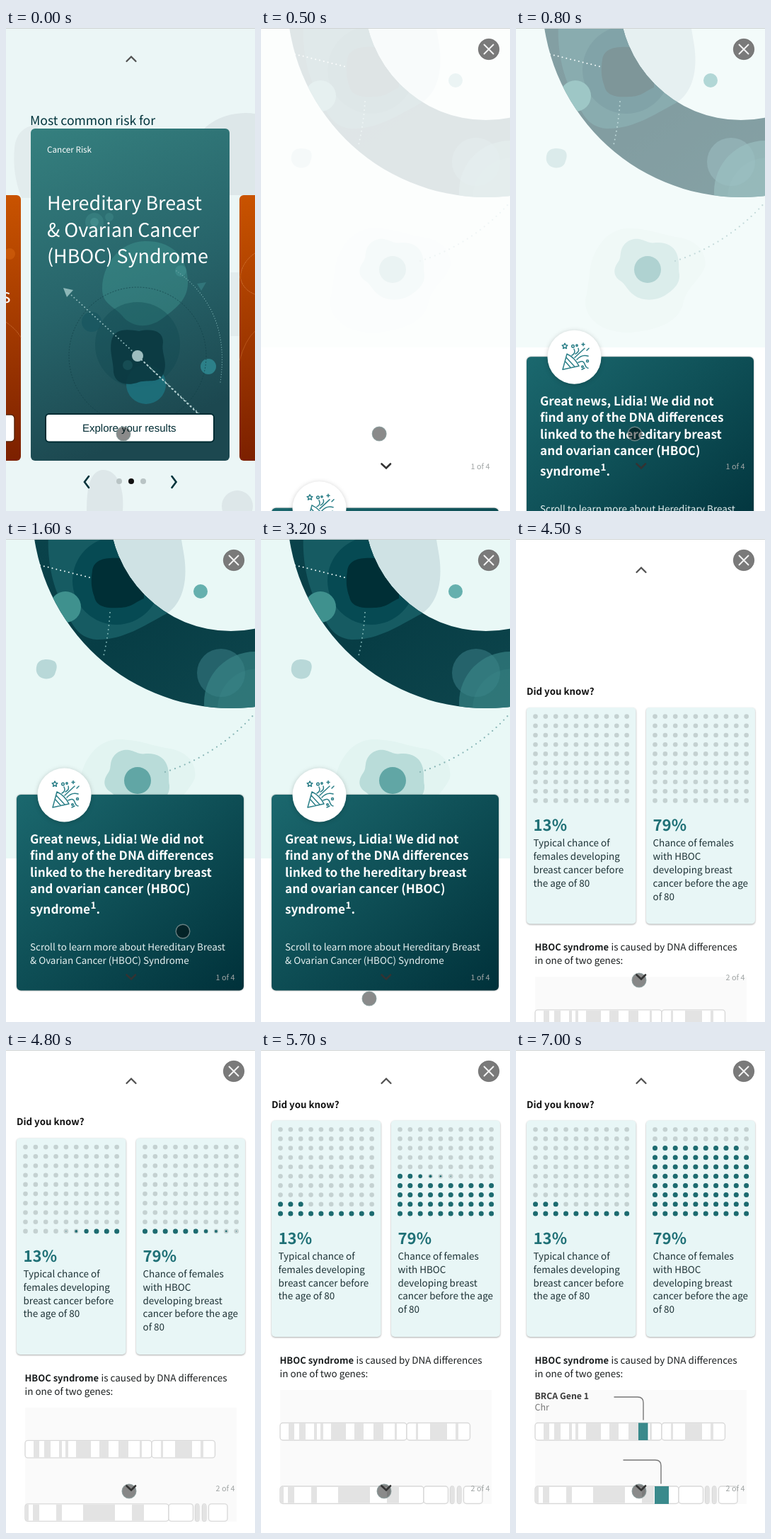
An HTML page that plays this animation: 352 px wide and 682 px high, repeating every 7100 ms.

```html
<!DOCTYPE html>
<html lang="en">
<head>
<meta charset="utf-8">
<title>Risk report</title>
<style>
  html, body { margin: 0; width: 100%; height: 100%; overflow: hidden; background: #fff; }
  svg { display: block; width: 100vw; height: 100vh; }
  text { font-family: "Noto Sans CJK SC", "Noto Sans CJK JP", "Noto Sans", sans-serif; font-size: 13.46px;
         white-space: pre; text-rendering: geometricPrecision; }
  .b { font-weight: 700; }
  .line { fill: none; stroke-linecap: round; }
  .dots { fill: none; stroke-linecap: round; stroke-width: 2; stroke-dasharray: 0 6; }
</style>
</head>
<body>
<svg viewBox="0 0 352 682">
  <defs>
    <linearGradient id="teal" x2=".25" y2="1"><stop stop-color="#35807f"/><stop offset=".55" stop-color="#27646a"/><stop offset="1" stop-color="#1c4850"/></linearGradient>
    <linearGradient id="rust" x2="0" y2="1"><stop stop-color="#c95300"/><stop offset="1" stop-color="#7c2000"/></linearGradient>
    <linearGradient id="deep" x2="1" y2="1"><stop stop-color="#1b686e"/><stop offset=".45" stop-color="#0f5057"/><stop offset="1" stop-color="#00313a"/></linearGradient>
    <linearGradient id="ringFill" x2="1" y2="1"><stop stop-color="#0a434b"/><stop offset=".5" stop-color="#073d45"/><stop offset="1" stop-color="#0e464d"/></linearGradient>
    <path id="ringShape" clip-rule="evenodd" d="M37-42a281 281 0 0 0 562 0a281 281 0 0 0-562 0zM146-42a172 172 0 0 1 344 0a172 172 0 0 1-344 0z"/>
    <clipPath id="ring"><use href="#ringShape" clip-rule="evenodd"/></clipPath>
    <clipPath id="hole"><circle cx="318" cy="-42" r="172"/></clipPath>
    <clipPath id="cardClip"><rect x="35" y="142" width="281" height="469" rx="6"/></clipPath>
    <path id="cloud" d="M60-5C58 30 66 68 80 92C92 118 100 140 128 142C165 143 196 122 222 108C246 97 258 66 252 25L247-5z"/>
  </defs>

  <g id="carousel">
    <rect width="352" height="682" fill="#ebf6f6"/>
    <g fill="#dde7e9">
      <path d="M268 160C280 130 320 116 352 121V236H300C275 215 262 185 268 160z"/>
      <path d="M12 170C14 145 30 138 45 136V240H22C12 215 10 190 12 170z" fill="#e2eced"/>
      <path d="M114 682C114 650 118 628 135 624C155 622 168 645 165 682z"/>
      <circle cx="327" cy="675" r="22"/>
      <rect x="317" y="345" width="14" height="90" fill="#e2eced"/>
    </g>
    <text x="34" y="137" fill="#01333b" style="font-size:17.6px">Most common risk for</text>

    <g fill="url(#rust)">
      <rect x="-260" y="236" width="281" height="375" rx="6"/>
      <rect x="330" y="236" width="281" height="375" rx="6"/>
    </g>
    <circle cx="5" cy="319" r="8" fill="#d8650f" opacity=".5"/>
    <path class="line" d="M-5 412Q14 424 21 437M352 318A45 45 0 0 0 331 352M331 352Q335 370 352 376" stroke="#e08a50" stroke-dasharray="1.5 1.5" opacity=".6"/>
    <path class="line" d="M330 470Q338 440 352 428" stroke="#d07030" opacity=".5"/>
    <text x="-6" y="388" fill="#fff" style="font-size:26.9px">s</text>
    <rect x="-30" y="546" width="42" height="38" rx="5" fill="#fff" stroke="#5a2408" stroke-width="1.5"/>

    <g clip-path="url(#cardClip)">
      <rect x="35" y="142" width="281" height="469" fill="url(#teal)"/>
      <path d="M136 368C136 335 160 302 196 301C236 300 258 325 257 362C256 384 240 396 224 408C204 425 178 424 164 406C152 392 136 390 136 368z" fill="#45a09a" opacity=".38"/>
      <circle cx="125" cy="274" r="13" fill="#4b9b99" opacity=".3"/>
      <circle cx="125" cy="274" r="6" fill="#5aa9a5" opacity=".35"/>
      <circle cx="146" cy="267" r="6" fill="#4b9b99" opacity=".3"/>
      <circle cx="186" cy="447" r="60" fill="#0e454d" opacity=".35"/>
      <circle cx="121" cy="415" r="14" fill="#17565f" opacity=".7"/>
      <circle cx="198" cy="503" r="28" fill="#1d7581" opacity=".8"/>
      <path d="M149 442C153 424 170 425 188 428C208 424 222 428 222 444C219 460 229 470 223 487C217 503 202 496 188 500C172 506 154 503 152 486C152 470 146 458 149 442z" fill="#0b3a42" opacity=".93"/>
      <circle cx="172" cy="476" r="7" fill="#164c53"/>
      <circle cx="286" cy="478" r="11" fill="#2c8089"/>
      <circle cx="247" cy="343" r="8" fill="#3f8f90" opacity=".6"/>
      <path d="M270 361L283 359L276 371z" fill="#3b8588" opacity=".6"/>
      <circle cx="186" cy="463" r="97" fill="none" stroke="#123f47" stroke-dasharray="2 2" opacity=".7"/>
      <path class="dots" d="M241 343Q318 398 303 500" stroke="#77adae" style="stroke-width:1.3;stroke-dasharray:0 3.5"/>
      <path class="dots" d="M89 374L186 463L280 551" stroke="#8fb9ba" style="stroke-dasharray:0 5"/>
      <path d="M186 463L272 545" stroke="#b9d3d4" stroke-width="1.8" stroke-dasharray="3 3"/>
      <path d="M81 367L95 370L86 380z" fill="#8db7b8"/>
      <circle cx="186" cy="463" r="8" fill="#9dbdbf"/>
    </g>
    <g fill="#fff">
      <text x="58" y="176" style="font-size:11.7px">Cancer Risk</text>
      <g id="cardTitle"></g>
    </g>
    <rect x="56" y="545" width="238" height="39.5" rx="5" fill="#fff" stroke="#002c33" stroke-width="2"/>
    <text x="108" y="570" fill="#002c33" style="font:15px 'Liberation Sans',Arial,sans-serif">Explore your results</text>
    <path class="line" d="M117 633L111 641L117 649M234.5 633L240.5 641L234.5 649" stroke="#01333b" stroke-width="2.6"/>
    <g fill="#b9c4c5"><circle cx="160" cy="640" r="4"/><circle cx="177" cy="640" r="4" fill="#111"/><circle cx="194" cy="640" r="4"/></g>
  </g>

  <g id="result">
    <g id="hero">
      <rect width="352" height="451" fill="#e9f8f6"/>
      <use href="#cloud" fill="#cfe2e4" clip-path="url(#hole)"/>
      <g clip-path="url(#ring)">
        <rect width="352" height="245" fill="url(#ringFill)"/>
        <use href="#cloud" fill="#165b62"/>
        <circle cx="156" cy="59" r="62" fill="#064a53"/>
        <path d="M122 45C124 28 142 26 160 27L195 40V84C184 88 178 97 160 97C145 98 128 97 125 82C120 68 120 58 122 45z" fill="#002f36"/>
        <circle cx="304" cy="189" r="34" fill="#25636b"/>
        <circle cx="352" cy="231" r="72" fill="#3a8688" opacity=".65"/>
        <circle cx="356" cy="240" r="57" fill="#43908f" opacity=".2"/>
        <circle cx="84" cy="96" r="22" fill="#3f918e"/>
      </g>
      <path class="dots" d="M48 37L121 55" stroke="#eaf6f5"/>
      <path class="dots" d="M147 104Q145 135 138 165" stroke="#7eb3b3"/>
      <circle cx="275" cy="74" r="10" fill="#65b0ae"/>
      <path d="M44 177C48 168 62 169 69 173C74 179 71 185 69 191C65 199 53 199 47 194C42 189 42 183 44 177z" fill="#b8d8d8"/>
      <path d="M104 345C108 312 128 284 158 283C190 283 204 292 232 296C258 301 270 318 267 338C258 358 240 368 236 390C230 416 196 428 160 430C122 431 96 410 98 384C102 368 102 360 104 345z" fill="#e2f4f1"/>
      <path d="M148 318C150 302 164 296 174 298C184 300 188 305 198 303C212 302 223 308 227 318C232 330 229 338 231 348C232 362 222 370 210 378C196 386 178 385 168 378C156 370 156 362 146 356C136 348 139 338 144 331C148 325 147 323 148 318z" fill="#b9dcd9"/>
      <circle cx="186" cy="341" r="19" fill="#61a6a5"/>
      <path class="dots" d="M225 329Q300 305 354 244" stroke="#8ab7b7" style="stroke-width:2.3;stroke-dasharray:0 7.4"/>
    </g>
    <g id="news">
      <rect x="15" y="361" width="321" height="276.5" rx="6" fill="url(#deep)" style="filter:drop-shadow(0 0 1px #0006)"/>
      <circle cx="82.5" cy="361.5" r="38" fill="#fff" style="filter:drop-shadow(0 1px 3px #0003)"/>
      <g class="line" stroke="#2b7f88" stroke-width="1.5" stroke-linejoin="round">
        <path d="M66 379L72 357Q83 362 89 374zM70 368L77 376M71 362L83 375"/>
        <path d="M79 359Q85 356 82 350M83 362L97 349M86 365Q93 357 102 360M88 369Q95 365 97 371T102 377M84 357Q90 354 88 349"/>
        <path d="M69 342l1.2 2.4 2.6.4-1.9 1.9.5 2.6-2.4-1.300-2.400 1.300.5-2.600-1.900-1.900 2.600-.4zM95 341.500v4M93 343.500h4M93 379l4-2M100 352l3-3"/>
        <circle cx="80.5" cy="346" r="1.8"/><circle cx="86" cy="345" r="1.2"/><circle cx="101" cy="367" r="1.5"/><circle cx="94" cy="375" r="1.3"/>
      </g>
      <g id="headline" fill="#fff"></g>
      <text class="b" x="119.5" y="521.5" fill="#fff" style="font-size:13.5px">1</text>
      <text class="b" x="127.5" y="529" fill="#fff" style="font-size:17.2px">.</text>
      <g id="hint" fill="#e6f1f1"></g>
    </g>
  </g>

  <g id="facts">
    <g id="page">
      <text class="b" x="15" y="81.5" fill="#111" style="font-size:13.3px">Did you know?</text>
      <g fill="#e8f6f6" style="filter:drop-shadow(0 1px 1px #0005)">
        <rect x="15" y="99.5" width="154.5" height="305.5" rx="5"/>
        <rect x="184" y="99.5" width="154" height="305.5" rx="5"/>
      </g>
      <g id="dotsLeft"></g><g id="dotsRight"></g>
      <g class="b" fill="#1f7076">
        <text x="24.5" y="274" style="font-size:22.2px">13%</text>
        <text x="193.5" y="274" style="font-size:22.2px">79%</text>
      </g>
      <g fill="#1d3236"><g id="typical"></g><g id="raised"></g></g>
      <g fill="#1b1f20">
        <text class="b" x="26.5" y="443" style="font-size:13px">HBOC syndrome</text>
        <text x="134.5" y="443">is caused by DNA differences</text>
        <text x="26.5" y="462">in one of two genes:</text>
      </g>
      <rect x="27" y="480" width="299" height="161" fill="#fafafa"/>
      <g id="genes"></g>
      <g id="marks" fill="#3a8a8c"><rect x="173" y="526.5" width="13.5" height="24.5"/><rect x="196" y="616" width="20" height="25"/></g>
      <path id="lead1" class="line" stroke="#777" stroke-width="1.4" d="M180 522V498Q180 490 172 490H139"/>
      <path id="lead2" class="line" stroke="#777" stroke-width="1.4" d="M205 612V587Q205 579 197 579H152"/>
      <text id="gene" class="b" x="26.5" y="493" fill="#3a3a3a" style="font-size:12.3px"></text>
      <text id="chr" x="26.5" y="509" fill="#777" style="font-size:12.5px"></text>
    </g>
  </g>

  <path id="up" class="line" d="M170.5 47L177 40.5L183.5 47" stroke="#505050" stroke-width="2.2"/>
  <g id="close">
    <circle cx="322" cy="30" r="14.7" fill="#7a7a7a" stroke="#6c6c6c" stroke-width=".8"/>
    <path class="line" d="M315.500 23.500L328.500 36.500M328.500 23.500L315.500 36.500" stroke="#f4f4f4" stroke-width="1.9"/>
  </g>
  <circle id="cursor" r="9.8" fill="rgba(0,0,0,.46)" stroke="rgba(128,145,145,.8)" stroke-width="1.4"/>
  <g id="pager">
    <path class="line" d="M170.5 615.5L177 621.5L183 615.5" stroke="#333" stroke-width="2.6"/>
    <text id="count" x="296.5" y="623" fill="#a0a5a5" style="font-size:10.8px"></text>
  </g>
  <rect width="352" height="1" fill="#cfd3d3"/>
</svg>
<script>
const LOOP = 7100, OPEN = 400, NEXT = 4100;
const $ = id => document.getElementById(id);
const clamp = v => Math.max(0, Math.min(1, v));
const span = (t, from, to) => clamp((t - from) / (to - from));
const show = (id, on) => $(id).style.display = on ? '' : 'none';

function add(parent, tag, attrs, text = '') {
  const el = document.createElementNS('http://www.w3.org/2000/svg', tag);
  for (const key in attrs) el.setAttribute(key, attrs[key]);
  el.textContent = text;
  return parent.appendChild(el);
}
function lines(id, x, y, pitch, style, rows) {
  rows.forEach((row, i) => add($(id), 'text', { x, y: y + i * pitch, style }, row));
}
const headlineStyle = 'font-size:17.2px;font-weight:700';
lines('cardTitle', 58, 257, 37.5, 'font-size:26.9px', ['Hereditary Breast', '& Ovarian Cancer', '(HBOC) Syndrome']);
lines('headline', 34, 429.5, 23.5, headlineStyle,
  ['Great news, Lidia! We did not', 'find any of the DNA differences', 'linked to the hereditary breast', 'and ovarian cancer (HBOC)']);
lines('headline', 34, 529, 0, headlineStyle, ['syndrome']);
lines('hint', 34, 581, 19, '', ['Scroll to learn more about Hereditary Breast', '& Ovarian Cancer (HBOC) Syndrome']);
lines('typical', 24.5, 296, 18.8, '', ['Typical chance of', 'females developing', 'breast cancer before', 'the age of 80']);
lines('raised', 193.5, 296, 18.8, '', ['Chance of females', 'with HBOC', 'developing breast', 'cancer before the age', 'of 80']);

// Grid of 100 dots; returns the ones that fill, bottom row first.
function dotGrid(id, x0, count, column) {
  const filled = [];
  for (let i = 0; i < 100; i++) {
    const row = Math.floor(i / 10);
    const pos = { cx: x0 + column(i % 10, row) * 14.35, cy: 231 - row * 13.2 };
    add($(id), 'circle', { ...pos, r: 3.3, fill: '#c4d1d1' });
    if (i < count) filled.push(add($(id), 'circle', { ...pos, r: 0, fill: '#1c6b70' }));
  }
  return filled;
}
const leftDots = dotGrid('dotsLeft', 27.5, 13, (c, row) => row % 2 ? c : 9 - c);
const rightDots = dotGrid('dotsRight', 196.5, 79, c => c);

function chromosome(y, arms, bands) {
  for (const [x, end] of arms)
    add($('genes'), 'rect', { x, y, width: end - x, height: 24.5, rx: 4, fill: '#fff', stroke: '#d9d9d9', 'stroke-width': 1.4 });
  for (const [x, end] of bands)
    add($('genes'), 'rect', { x, y: y + .7, width: end - x, height: 23, fill: '#e3e3e3' });
}
chromosome(526.5, [[27, 206], [206, 295.5]],
  [[39, 47], [54, 63], [75, 79], [84, 88], [99, 120], [132, 145], [159, 173], [189, 192], [219, 222], [239, 263], [275, 279]]);
chromosome(616, [[27, 230], [230, 264.5], [267.5, 273], [277.5, 283], [286.5, 313]],
  [[28, 32], [38, 47], [71, 79], [109, 154], [178, 195], [268, 273], [278, 283]]);

const path = [[0, 166, 573], [900, 168, 573], [1600, 250, 554], [2500, 250, 554],
              [3000, 160, 653], [3200, 153, 649], [3500, 153, 649], [3950, 174, 623], [LOOP, 174, 623]];
function cursorAt(t) {
  const i = path.findIndex(p => p[0] > t);
  const [a, x, y] = path[i - 1], [b, x2, y2] = path[i];
  let u = span(t, a, b);
  u = u * u * (3 - 2 * u);
  return [x + (x2 - x) * u, y + (y2 - y) * u];
}
function grow(dots, t, step) {
  dots.forEach((dot, i) => dot.setAttribute('r', 3.5 * span(t, 4555 + i * step, 4680 + i * step)));
}
function trace(id, u) {
  const el = $(id), length = el.getTotalLength();
  el.style.strokeDasharray = `${length * u} 999`;
  show(id, u > 0);
}
const typed = (text, u) => text.slice(0, Math.round(text.length * u));

function draw(t) {
  const first = t < OPEN, last = t >= NEXT;
  show('carousel', first);
  show('result', !first && !last);
  show('facts', last);
  show('up', first || last);
  show('close', !first);
  show('pager', !first);
  $('count').textContent = last ? '2 of 4' : '1 of 4';

  const enter = span(t, OPEN, 1200);
  $('hero').setAttribute('opacity', enter);
  $('news').setAttribute('transform', `translate(0 ${415 * (1 - enter) ** 2})`);

  const scroll = 548 * (1 - span(t, NEXT, 5190)) ** 3;
  $('page').setAttribute('transform', `translate(0 ${scroll})`);
  show('dotsRight', t >= 4200);
  grow(leftDots, t, 45);
  grow(rightDots, t, 25);
  $('marks').setAttribute('opacity', span(t, 5900, 6300));
  trace('lead1', span(t, 6300, 6900));
  trace('lead2', span(t, 6400, 7000));
  $('gene').textContent = typed('BRCA Gene 1', span(t, 6400, 6750));
  $('chr').textContent = typed('Chr', span(t, 6750, 6980));

  const [x, y] = cursorAt(t);
  $('cursor').setAttribute('cx', x);
  $('cursor').setAttribute('cy', y);
}
function frame() {
  draw(performance.now() % LOOP);
  requestAnimationFrame(frame);
}
frame();
</script>
</body>
</html>
```
